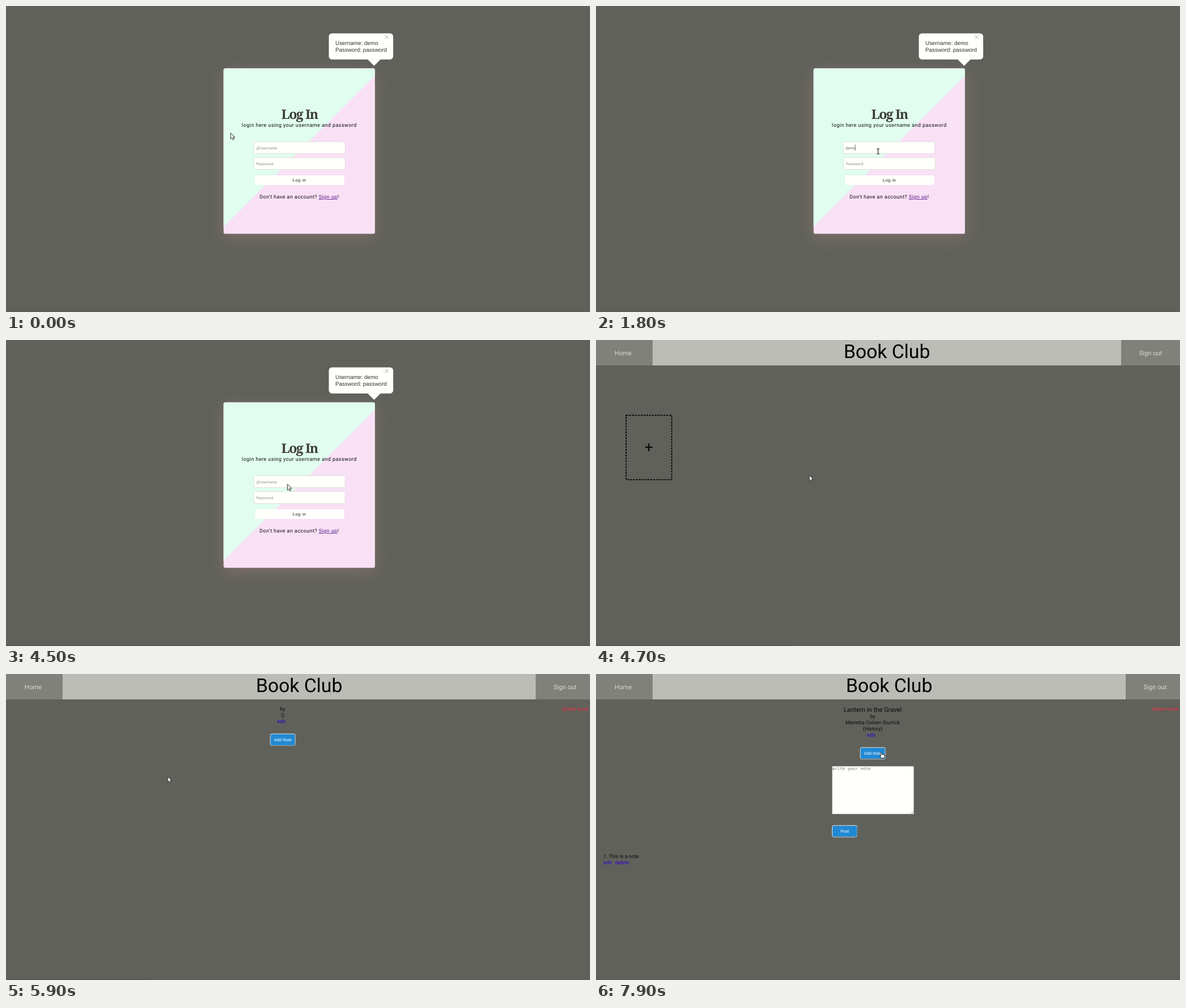
Animation, 1032 px wide and 542 px high, one loop 8 s. Source, as an HTML page:

```html
<!DOCTYPE html>
<html lang="en">
<head>
<meta charset="utf-8">
<title>Book Club</title>
<style>
  html, body { margin: 0; width: 100%; height: 100%; overflow: hidden; background: #60615b; }
  svg { display: block; width: 100vw; height: 100vh; }
  text { font: 9px Roboto, sans-serif; fill: #0c0c0c; white-space: pre; text-rendering: geometricPrecision; }
  .mid text, text.mid { text-anchor: middle; }
  .spaced { letter-spacing: .45px; }
  .title { font: 700 23px "Noto Serif", serif; letter-spacing: -1.4px; fill: #3a3a37; }
  .tip { font: 9.9px "Liberation Sans", Arial, sans-serif; fill: #303030; }
  .field rect { fill: #fffffb; stroke: #d9d9d6; stroke-width: .8; }
  .field text { font-size: 6.8px; fill: #8d8d8b; }
  .field .typed { fill: #6a6a68; }
  .field .dots { font: 10.7px "Liberation Sans", Arial, sans-serif; }
  .btn { font: 7.5px "Liberation Sans", Arial, sans-serif; fill: #fff; text-anchor: middle; }
  .brand { font-size: 33.75px; fill: #000; }
  .nav { font-size: 11.25px; fill: #dadad6; }
  .link { fill: #3000cc; }
  .note { font: 7.5px "DejaVu Sans Mono", monospace; fill: #757575; }
</style>
</head>
<body>
<svg viewBox="0 0 1032 542" preserveAspectRatio="none">
  <defs>
    <filter id="soft" x="-30%" y="-30%" width="160%" height="160%"><feGaussianBlur stdDeviation="15"/></filter>
    <clipPath id="cardClip"><rect x="384.5" y="110.5" width="267.5" height="293" rx="3"/></clipPath>
    <g id="blueBtn">
      <rect x=".5" y=".5" width="44" height="20.5" rx="2.5" fill="#2189d3" stroke="#e2e2e0"/>
      <path d="M1 20.5Q1.500 21 3 21H42Q44.500 21 44.500 18.500V2" fill="none" stroke="#8f9396"/>
    </g>
  </defs>
  <rect width="1032" height="542" fill="#60615b"/>
  <rect y="540" width="1032" height="2" fill="#5d5c57"/>
  <rect id="status" y="540" height="2"/>

  <g id="login">
    <rect x="384.5" y="118" width="267.5" height="293" fill="#917470" opacity=".65" filter="url(#soft)"/>
    <g clip-path="url(#cardClip)">
      <rect x="384" y="110" width="269" height="294" fill="#f9e0f5"/>
      <path d="M384 110H653V122.500L384 391.500Z" fill="#e0fdef"/>
    </g>
    <rect x="570.5" y="48.5" width="113.700" height="46.200" rx="5.500" fill="#fffffc"/>
    <path d="M639 94.500H662L650.500 106Z" fill="#fffffc"/>
    <path d="M669.300 51.800L675.800 58.300M675.800 51.800L669.300 58.300" stroke="#999" stroke-width=".9"/>
    <text class="tip" x="582" y="69">Username: demo</text>
    <text class="tip" x="582" y="80.700">Password: password</text>
    <text class="title" x="486.500" y="200">Log In</text>
    <text class="spaced" x="416.800" y="214">login here using your username and password</text>
    <g id="user" class="field">
      <rect x="437.700" y="240.300" width="161.700" height="21" rx="2.500"/>
      <text x="442" y="253.500"></text>
      <path d="M0 245.500V256" stroke="#4a4a48" stroke-width=".8"/>
    </g>
    <g id="pass" class="field">
      <rect x="437.700" y="268.500" width="161.700" height="21" rx="2.500"/>
      <text x="442" y="281.700"></text>
      <path d="M0 274V284" stroke="#4a4a48" stroke-width=".8"/>
    </g>
    <rect x="440" y="300" width="157.600" height="17" rx="2.500" fill="#fffffc"/>
    <text class="btn" x="518.500" y="310.800" style="fill:#222;letter-spacing:.5px">Log in</text>
    <text class="spaced" x="448" y="341">Don't have an account? <tspan fill="#551a8b" text-decoration="underline">Sign up</tspan>!</text>
  </g>

  <g id="header" class="mid">
    <rect width="1032" height="45" fill="#bbbcb6"/>
    <rect width="100" height="45" fill="#80817b"/>
    <rect id="outBox" width="110" height="45" fill="#80817b"/>
    <text id="brand" class="brand" y="32">Book Club</text>
    <text class="nav" x="48" y="26.600">Home</text>
    <text id="outText" class="nav" y="26.600">Sign out</text>
  </g>

  <g id="home">
    <rect x="53.200" y="133.300" width="80.600" height="114" fill="none" stroke="#000" stroke-width="1.700" stroke-dasharray="3.400 1.700"/>
    <text class="mid" x="93.300" y="199.300" style="font-size:27px">+</text>
  </g>

  <g id="book">
    <text x="982.800" y="65" style="fill:#ee2f45">delete book</text>
    <g class="mid">
      <text id="name" x="489" y="67" style="font-size:11.25px">Lantern in the Gravel</text>
      <g id="details">
        <text x="489" y="65">by</text>
        <text id="author" x="489" y="75.800">Marietta Colven Sturrick</text>
        <text id="genre" x="489"></text>
        <text id="edit" class="link" x="486.500">edit</text>
      </g>
    </g>
    <g id="add">
      <use href="#blueBtn" x="466.600"/>
      <text class="btn" x="489.200" y="13.300">Add Note</text>
    </g>
    <g id="form">
      <rect x="417.300" y="163.300" width="144.200" height="84.700" fill="#fffffc" stroke="#a3a3a0" stroke-width=".6"/>
      <path d="M556.500 247.300L561 242.800M559 247.300L561 245.300" stroke="#777" stroke-width=".6"/>
      <text class="note" x="417.500" y="170.300">write your note</text>
      <use href="#blueBtn" x="417" y="267.800"/>
      <text class="btn" x="439.500" y="281.200">Post</text>
    </g>
    <g id="notes">
      <text x="13" y="188.200">1. This is a note</text>
      <text class="link" x="13" y="199">edit</text>
      <text class="link" x="33.500" y="199">delete</text>
    </g>
  </g>

  <g id="cursor" stroke-linejoin="round">
    <path id="arrow" d="M0 0V10.500L2.500 8.300 4.200 12 6 11.200 4.400 7.600H7.600Z" fill="#fff" stroke="#151515" stroke-width=".9"/>
    <g id="beam" fill="none">
      <path d="M-2.500 -4.500H2.500M-2.500 4.500H2.500M0 -4.500V4.500" stroke="#fff" stroke-width="2.600"/>
      <path d="M-2.500 -4.500H-.8L0 -4 .8 -4.500H2.500M-2.500 4.500H-.8L0 4 .8 4.500H2.500M0 -4V4" stroke="#222" stroke-width="1.200"/>
    </g>
    <path id="hand" d="M0 .2Q1.200 -.8 2 .6L2.800 3.400 5.500 3.600 7.400 4.600V7.700L6.300 10H1.900L-.8 6.800Q-1.400 5.400 0 5.600L1 6.300Z" fill="#fff" stroke="#151515" stroke-width=".9"/>
  </g>
</svg>
<script>
const LOOP = 8000, STEP = 100;
const $ = id => document.getElementById(id);
const show = (id, on) => { $(id).style.display = on ? '' : 'none'; };
const set = (id, attrs) => { for (const k in attrs) $(id).setAttribute(k, attrs[k]); };
const ramp = (t, a, b) => Math.min(1, Math.max(0, (t - a) / (b - a)));
const within = (t, a, b) => t >= a && t < b;

// time, x, y, shape
const path = [
  [0, 397, 225, 'arrow'], [100, 397, 225, 'arrow'],
  [400, 473, 249.5, 'beam'], [500, 498.5, 257.5, 'beam'], [4000, 498.5, 257.5, 'beam'],
  [4100, 497.3, 255.3, 'arrow'], [4600, 497.3, 255.3, 'arrow'], [4700, 377, 240, 'arrow'],
  [5400, 290, 194, 'arrow'], [5900, 286, 182, 'arrow'], [6400, 431, 121, 'arrow'],
  [6800, 30.5, 153, 'arrow'], [6900, 30.5, 153, 'arrow'],
  [7000, 12.3, 193, 'arrow'], [7100, 12.3, 193, 'arrow'],
  [7700, 576, 127, 'arrow'], [7900, 502.5, 139, 'hand'], [LOOP, 502.5, 139, 'hand']
];

// time, characters present
const userKeys = [[1500, 2], [1700, 3], [1800, 4]];
const passKeys = [[2300, 1], [2400, 2], [2500, 4], [2800, 5], [3000, 7], [3200, 8]];
const userCaret = [441.5, 445, 448.5, 454.3, 458];

const typed = (keys, t) => keys.reduce((n, [at, count]) => t >= at ? count : n, 0);

function drawCursor(t) {
  const i = path.findIndex((k, n) => t >= k[0] && t < path[n + 1][0]);
  const [t0, x0, y0, shape] = path[i], [t1, x1, y1] = path[i + 1];
  const p = ramp(t, t0, t1);
  const size = t < 4700 || shape === 'hand' ? 1 : .9;
  set('cursor', { transform: `translate(${x0 + (x1 - x0) * p} ${y0 + (y1 - y0) * p}) scale(${size})` });
  for (const s of ['arrow', 'beam', 'hand']) show(s, s === shape);
}

function drawField(id, text, style, shift, caretX, caretOn) {
  const [, label, caret] = $(id).children;
  $(id).setAttribute('transform', `translate(${-shift} 0)`);
  label.textContent = text;
  label.setAttribute('class', style);
  caret.setAttribute('transform', `translate(${caretX + shift} 0)`);
  caret.style.display = caretOn ? '' : 'none';
}

function drawLogin(t) {
  const live = t < 4500;
  const u = live ? typed(userKeys, t) : 0, p = live ? typed(passKeys, t) : 0;
  const userShift = ramp(t, 600, 900) - ramp(t, 1900, 2100);
  const passShift = live ? ramp(t, 1900, 2100) : 0;
  drawField('user', u ? 'demo'.slice(0, u) : '@Username', u ? 'typed' : '', userShift,
    userCaret[u], within(t, 800, 1300) || within(t, 1500, 2000));
  drawField('pass', p ? '•'.repeat(p) : 'Password', p ? 'typed dots' : '', passShift,
    441.3 + 3.72 * p, within(t, 2000, 3800) || within(t, 4200, 4500));
}

function drawHeader(home) {
  set('outBox', { x: home ? 928 : 936 });
  set('outText', { x: home ? 980 : 988 });
  set('brand', { x: home ? 514 : 518 });
  document.querySelectorAll('.nav').forEach(n => { n.style.fontSize = home ? '11.1px' : '11.25px'; });
}

function drawBook(t) {
  const loaded = t >= 6000, open = t >= 7900;
  show('name', loaded);
  show('author', loaded);
  show('notes', loaded);
  show('form', open);
  set('details', { transform: `translate(0 ${loaded ? 13.3 : 0})` });
  $('genre').textContent = loaded ? '(History)' : '()';
  set('genre', { y: loaded ? 86.6 : 75.8 });
  set('edit', { y: loaded ? 97.3 : 86.5 });
  set('add', { transform: `translate(0 ${loaded ? 129.7 : 105.6})` });
  set('notes', { transform: `translate(0 ${open ? 138 : 0})` });
}

function render(time) {
  const t = Math.floor(time / STEP) * STEP;
  const home = within(t, 4700, 5600);
  show('login', t < 4700);
  show('header', t >= 4700);
  show('home', home);
  show('book', t >= 5600);
  show('status', within(t, 3800, 6000));
  set('status', {
    width: t < 4100 || t >= 5600 ? 256 : 343,
    fill: t < 5600 ? '#4d5658' : '#55555d'
  });
  drawLogin(t);
  drawHeader(home);
  drawBook(t);
  drawCursor(t);
}

const start = performance.now();
function tick() {
  render((performance.now() - start) % LOOP);
  requestAnimationFrame(tick);
}
tick();
</script>
</body>
</html>
```
